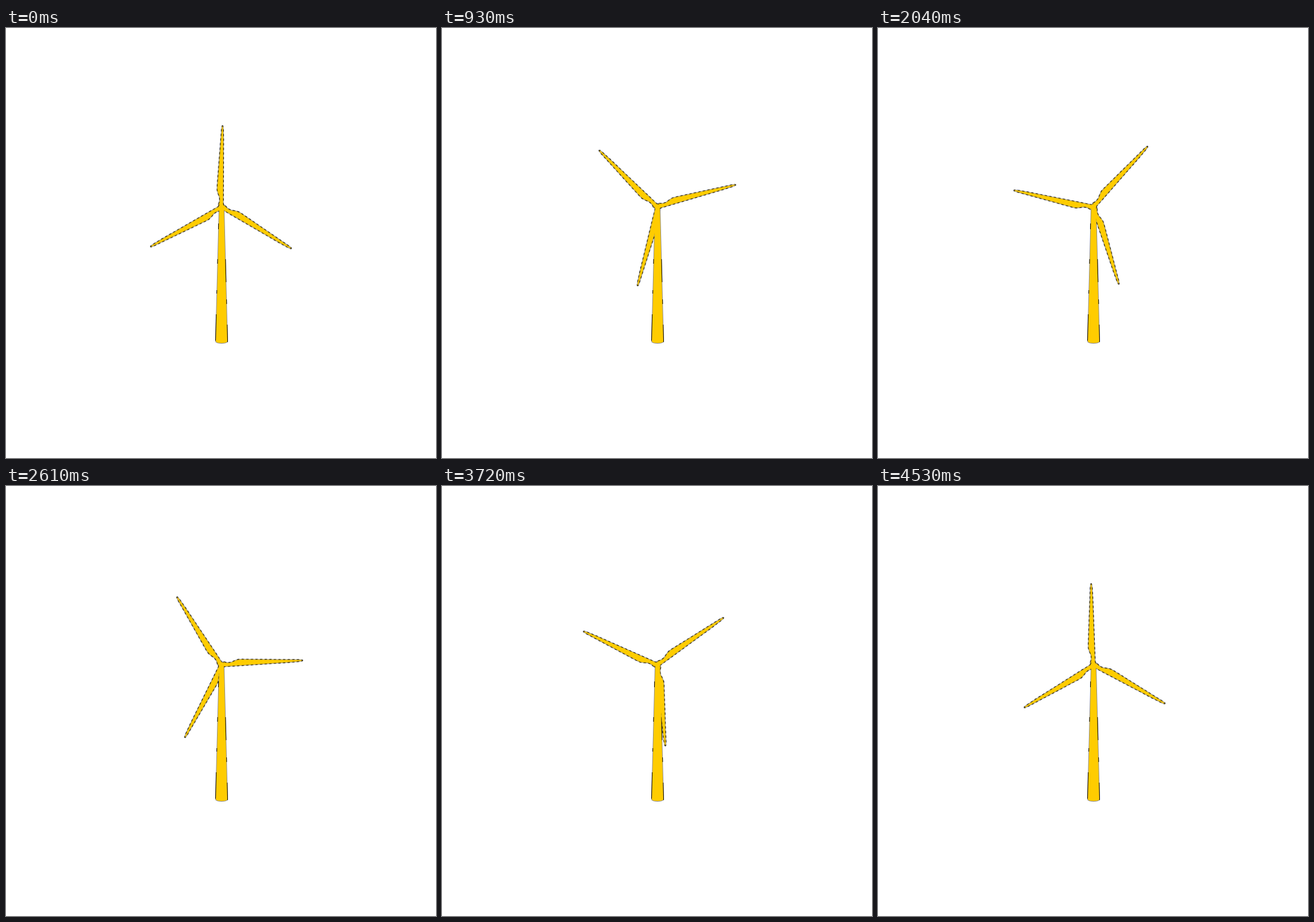
An HTML page for the animation above (4560 ms loop, 748 px wide and 748 px high).

```html
<!DOCTYPE html>
<html lang="en">
<head>
<meta charset="utf-8">
<title>Wind turbine</title>
<style>
  html, body { margin: 0; width: 100%; height: 100%; overflow: hidden; background: #fff; }
  svg { display: block; width: 100%; height: 100%; }
  .soft { fill: none; stroke: #85858c; stroke-width: 1.8; }
  .dark { fill: none; stroke: #000; stroke-width: 2.1; }
  .fill { fill: #fc0; }
  .dark .rotor { stroke-dasharray: 4 4; }
  .dark .tower { stroke-dasharray: 0 26 10 52 8 46 6 36 46 22 30 36 8 30 40 200; }
</style>
</head>
<body>
<svg viewBox="0 0 748 748">
  <defs>
    <path id="blade" d="M2.8 -3 L3.2 -118 L2.8 -136 Q2.5 -140.8 1.8 -141 Q1.1 -140.8 .6 -136 L-7.2 -34
      C-7.8 -26 -4.4 -22 -3.3 -17.5 C-2.4 -13 -2.7 -9 -5 -4 Z"/>
    <g id="rotor">
      <use href="#blade"/>
      <use href="#blade" transform="rotate(120)"/>
      <use href="#blade" transform="rotate(240)"/>
      <circle r="5"/>
    </g>
    <path id="tower" d="M371 314 L365 545.5 Q367 548 375 548 Q383 548 385 545.5 L379 314 Z"/>
  </defs>
</svg>
<script>
  const LOOP = 4560, STEP = 30;
  const svg = document.querySelector('svg');

  // Outlines lie below all fills, so only the merged silhouette keeps its edge.
  for (const layer of ['soft', 'dark', 'fill']) {
    svg.insertAdjacentHTML('beforeend', `
      <g class="${layer}">
        <use class="tower" href="#tower"/>
        <g transform="translate(374.8 311.3)"><g class="rotor"><use href="#rotor"/></g></g>
      </g>`);
  }

  for (const rotor of svg.querySelectorAll('.rotor')) {
    rotor.animate(
      { transform: ['rotate(0deg)', 'rotate(360deg)'] },
      { duration: LOOP, iterations: Infinity, easing: `steps(${LOOP / STEP}, end)` }
    ).startTime = 0;
  }
</script>
</body>
</html>
```
